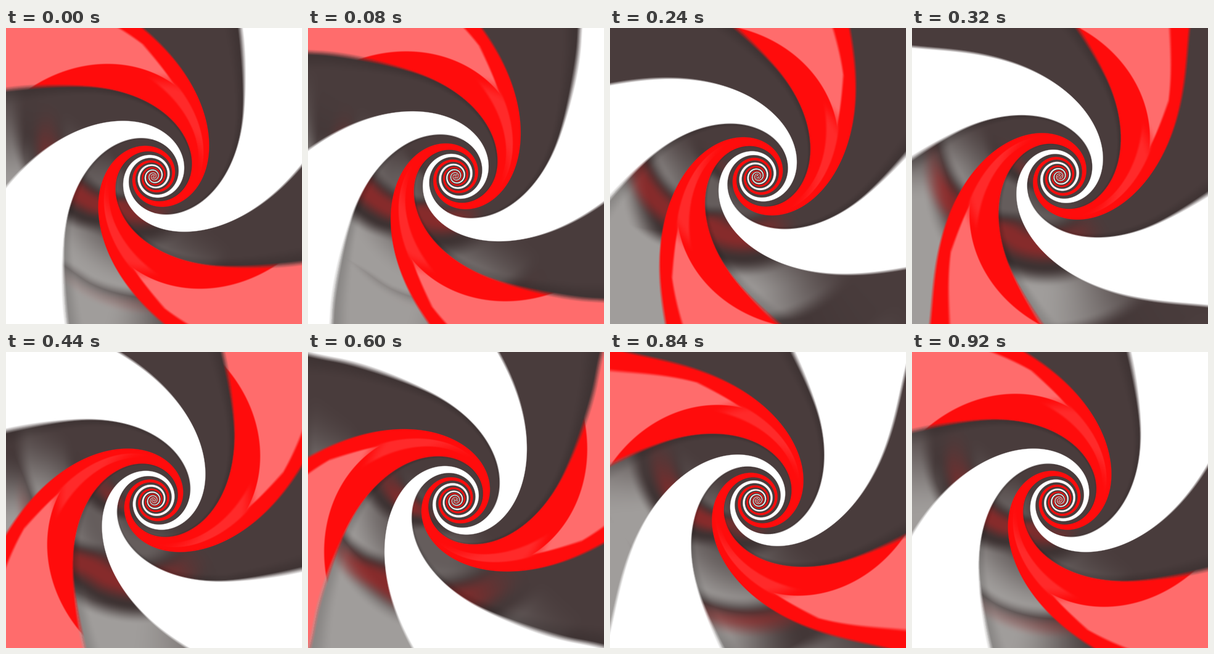
Recreate the animation shown at these times as an HTML page with a canvas. Size 480x480 px, loop 960 ms.

```html
<!DOCTYPE html>
<html lang="en">
<head>
<meta charset="utf-8">
<title>Spiral tunnel</title>
<style>
html, body { margin: 0; width: 100%; height: 100%; overflow: hidden; background: #483c3c; }
canvas { display: block; width: 480px; height: 480px; }
</style>
</head>
<body>
<canvas id="stage" width="480" height="480"></canvas>
<script>
const SIZE = 480, CX = 239.5, CY = 240.5;
const LOOP = 960, STEP = 40, STEPS = LOOP / STEP;
const PITCH = 10640; // degrees of twist times pixels
const CORE = 34;     // inside this radius the windings form a logarithmic spiral
const HALF = 23.5;   // half the angular width of a ribbon

const ctx = document.getElementById('stage').getContext('2d');
const clamp = v => v < 0 ? 0 : v > 1 ? 1 : v;
const ramp = (a, b, v) => { const t = clamp((v - a) / (b - a)); return t * t * (3 - 2 * t); };
const wrap = (v, period) => v - period * Math.floor(v / period + 0.5);

// Static geometry of every pixel
const count = SIZE * SIZE;
const field = () => new Float32Array(count);
const radius = field(), twist = field(), soft = field(), tail = field();
const echo = field(), gloss = field(), floor = field();

for (let y = 0, i = 0; y < SIZE; y++) {
  for (let x = 0; x < SIZE; x++, i++) {
    const dx = x + 0.5 - CX, dy = y + 0.5 - CY;
    const r = Math.max(0.6, Math.hypot(dx, dy));
    const angle = Math.atan2(dy, dx) * 180 / Math.PI;
    const inner = Math.min(1, r / CORE), rr = Math.max(r, CORE);
    const depth = PITCH / rr - PITCH / CORE * Math.log(inner);
    const slope = PITCH / (rr * r);
    radius[i] = r;
    twist[i] = angle - depth + 9.8 * ramp(110, 340, r) - 24;
    const blur = 1.3 + 5 * ramp(130, 270, r);
    soft[i] = Math.min(58, blur * Math.hypot(57.3 / r, slope));
    tail[i] = HALF + 3.5 * ramp(50, 80, r) * (1 - ramp(180, 300, r));

    // Blurred reflection, wound the other way, on the lower left wall
    const turn = wrap(angle - 135, 360);
    const reach = r > 70 ? (r - 70) / 0.97 : 72 - 5050 / r;
    echo[i] = reach - turn * (0.4 + 1.4 * ramp(-15, 15, turn));
    gloss[i] = ramp(-95, -35, turn) * (1 - ramp(38, 84, turn)) * ramp(30, 75, r);
    floor[i] = ramp(-65, -25, turn) * (1 - ramp(35, 65, turn)) * ramp(175, 225, r);
  }
}

function paint(rot) {
  const img = ctx.createImageData(SIZE, SIZE), px = img.data;
  for (let i = 0, o = 0; i < count; i++, o += 4) {
    const r = radius[i], s = soft[i], t = tail[i];
    const q = wrap(twist[i] - rot, 180);
    const lag = r > 60 ? s * 1.6 : s;
    const cover = v => Math.min(clamp((HALF - v) / s + 0.5), clamp((t + v) / lag + 0.5));
    const red = cover(q);
    const white = Math.min(1 - red, cover(wrap(q - 90, 180)));
    let cr = 0, cg = 0, cb = 0;

    const gap = 1 - red - white;
    if (gap > 0.002) {
      cr = 73; cg = 60; cb = 60;
      const m = gloss[i];
      if (m > 0) {
        const p = wrap(echo[i] - rot, 180);
        const band = m * (1 - ramp(28, 62, Math.abs(wrap(p - 98, 180))));
        const grey = Math.max(floor[i], band * (0.4 + 0.6 * ramp(100, 190, r)));
        const glow = m * 0.62 * (1 - ramp(4, 38, Math.abs(p))) * (1 - ramp(185, 230, r));
        const shade = 1 - 0.16 * m;
        cr *= shade; cg *= shade; cb *= shade;
        cr += (160 - cr) * grey; cg += (157 - cg) * grey; cb += (155 - cb) * grey;
        cr += (178 - cr) * glow; cg += (38 - cg) * glow; cb += (38 - cb) * glow;
      }
      // contact shadow beneath the trailing edge of each ribbon
      const off = -t - wrap(q, 90);
      if (off > 0) {
        const d = 1 - 0.15 * (1 - ramp(0, 8, off));
        cr *= d; cg *= d; cb *= d;
      }
      cr *= gap; cg *= gap; cb *= gap;
    }

    if (red > 0) {
      let light = 12;
      if (r > 70) {
        const e = Math.max(1, s * 0.5);
        const low = 6 - (r - 162) * 0.375;
        const high = Math.min(16, 10 + (r - 155) * 0.1);
        const pink = ramp(-e, e, q - low) * ramp(-e, e, high - q) * ramp(142, 172, r);
        const sheen = ramp(-4, 0, q) * (1 - ramp(10, 13, q)) * ramp(70, 105, r) * (1 - ramp(140, 165, r));
        light += 96 * pink + 30 * sheen;
      }
      cr += 255 * red; cg += light * red; cb += light * red;
    }

    px[o] = cr + 255 * white;
    px[o + 1] = cg + 255 * white;
    px[o + 2] = cb + 255 * white;
    px[o + 3] = 255;
  }
  return img;
}

const cache = [];
let shown = -1;
const start = performance.now();

function draw(now) {
  const step = Math.floor(Math.max(0, now - start) % LOOP / STEP);
  if (step !== shown) {
    cache[step] = cache[step] || paint(step * 180 / STEPS);
    ctx.putImageData(cache[step], 0, 0);
    shown = step;
  }
  requestAnimationFrame(draw);
}
draw(start);
</script>
</body>
</html>
```
